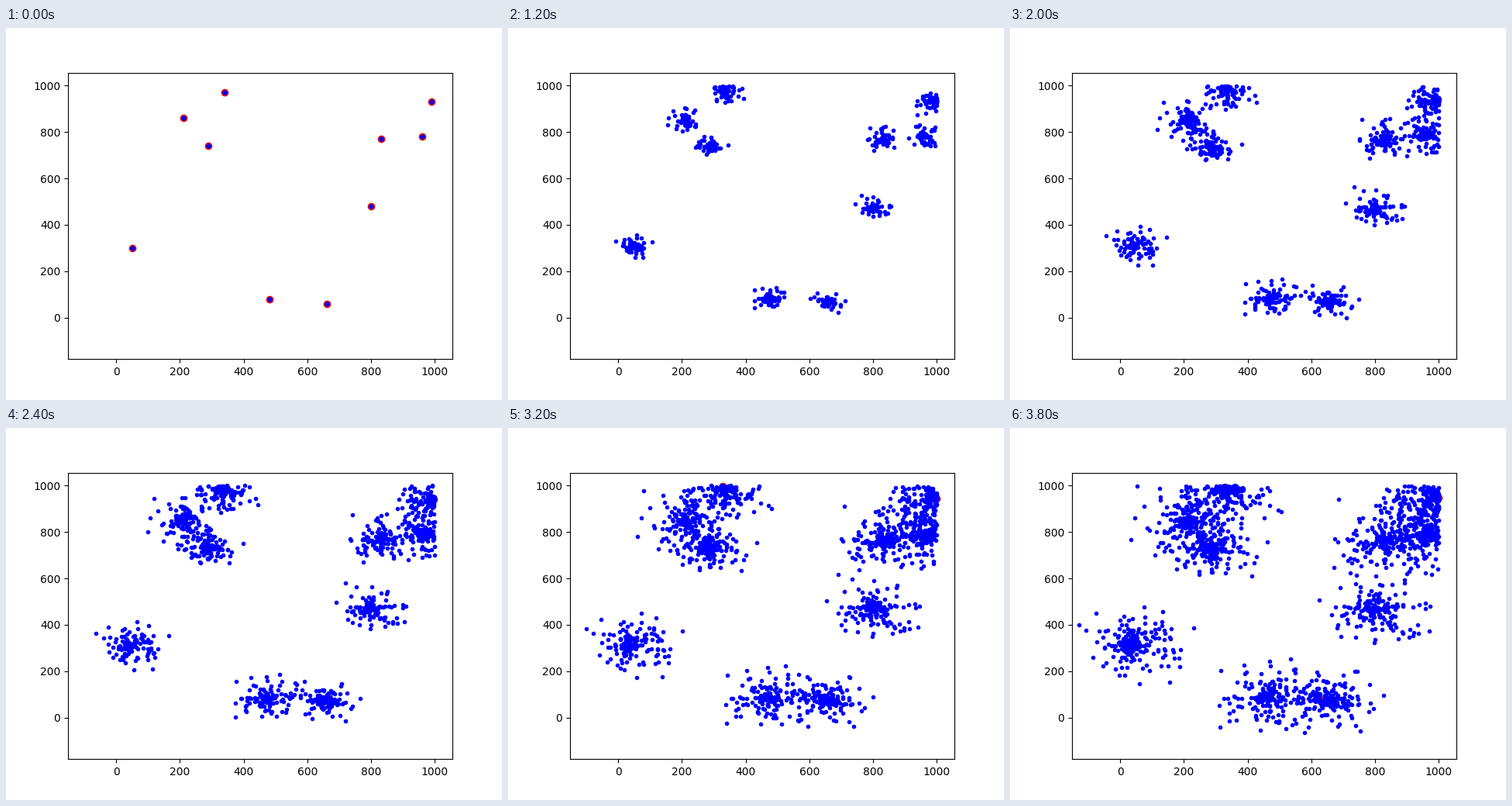
Write a matplotlib script that moves like this. It is 640 by 480 pixels and loops after 4 s.

```python
import numpy as np
import matplotlib.pyplot as plt
from matplotlib.animation import FuncAnimation

FRAMES = 20
INTERVAL = 200
PER_STEP = 10      # particles each emitter releases per step
MAX_SPEED = 9.6    # per axis and step
FOCUS = 1.4        # above 1 favours slow particles, so cores stay dense
WALL = 1000

# Emitters: start x, y and drift per step
EMITTERS = np.array([
    (50, 300, -1.4, 1.4),
    (210, 860, -0.2, -0.8),
    (290, 740, -0.6, -1.0),
    (340, 970, -0.7, 1.8),
    (480, 80, -0.9, 0.6),
    (660, 60, -0.8, 1.2),
    (800, 480, -0.4, -0.9),
    (830, 770, 0.1, -0.1),
    (960, 780, 0.3, 0.5),
    (990, 930, 0.6, 0.95),
])
START, DRIFT = EMITTERS[:, :2], EMITTERS[:, 2:]


def bounce(pos):
    """Mirror positions that pass the upper and right walls."""
    return WALL - np.abs(WALL - pos)


def emitters(step):
    return bounce(START + DRIFT * step)


rng = np.random.default_rng(7)
u = rng.uniform(-1, 1, (FRAMES, len(START), PER_STEP, 2))
VEL = MAX_SPEED * np.sign(u) * np.abs(u) ** FOCUS
ORIGIN = np.array([emitters(b) for b in range(FRAMES)])[:, :, None, :]


def particles(step):
    """All particles released so far, flying straight from their birthplace."""
    born = slice(0, step + 1)
    age = np.arange(step, -1, -1)[:, None, None, None]
    return bounce(ORIGIN[born] + VEL[born] * age).reshape(-1, 2)


fig, ax = plt.subplots(figsize=(6.4, 4.8), dpi=100)
ax.set_xlim(-151.2, 1054.8)
ax.set_ylim(-178.9, 1056.1)
sources, = ax.plot([], [], "ro")
dots, = ax.plot([], [], "b.")


def update(step):
    sources.set_data(*emitters(step).T)
    dots.set_data(*particles(step).T)
    return sources, dots


anim = FuncAnimation(fig, update, frames=FRAMES, interval=INTERVAL,
                     repeat=True, repeat_delay=0)
plt.show()
```
